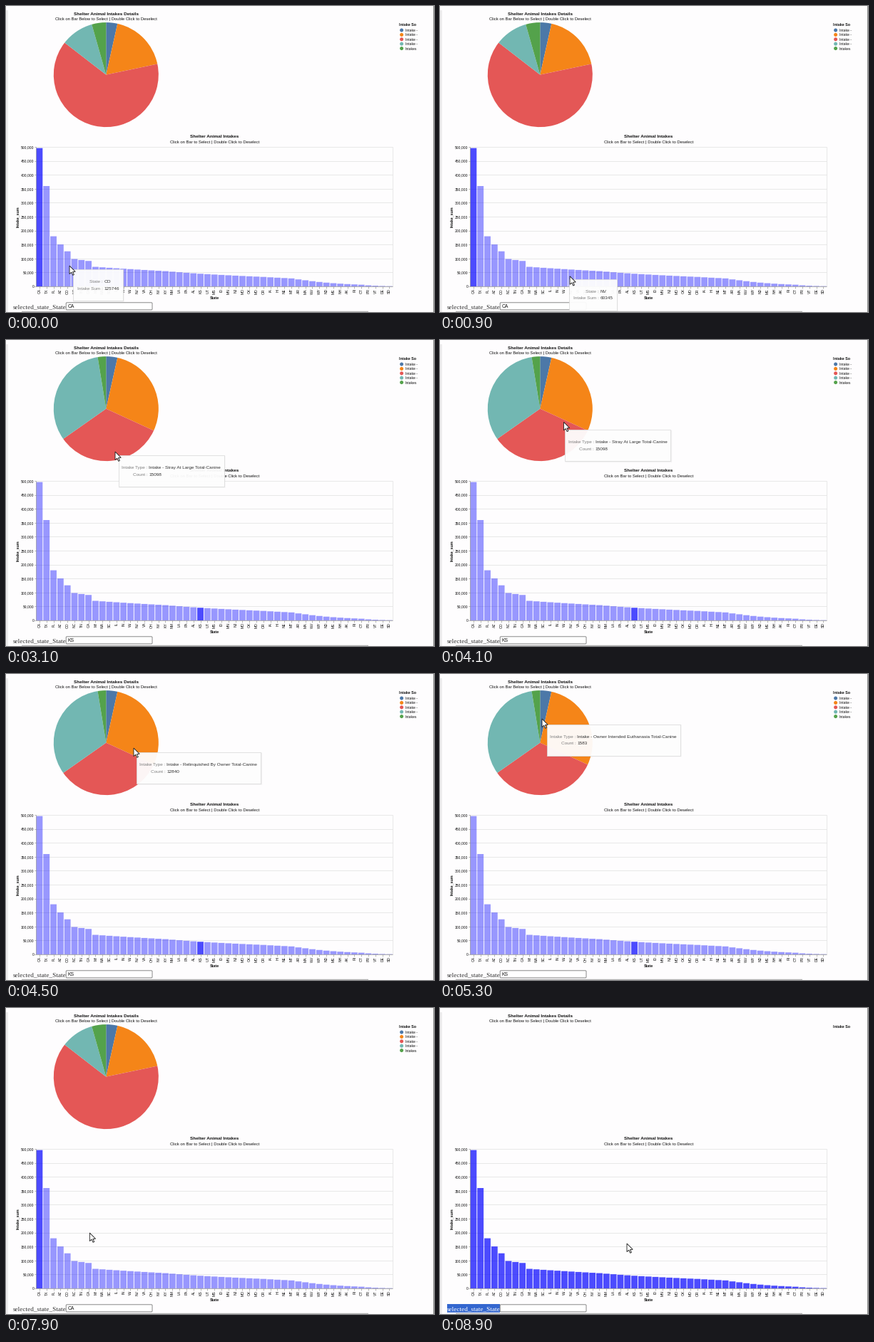
A matplotlib script that plays this animation: 600x430 px, repeating every 9 s.

```python
import math

import matplotlib.pyplot as plt
import numpy as np
from matplotlib.animation import FuncAnimation
from matplotlib.patches import Circle, FancyBboxPatch, Polygon, Rectangle, Wedge

W, H, DPI = 600, 430, 100
STEP, LOOP = 100, 9000
SANS, SERIF = "Liberation Sans", "Liberation Serif"

STATES = ("CA TX FL AZ CO NC TN GA MI WA SC IL IN WI NV VA OH NY KY NM LA PA AL KS "
          "UT MS ID MN NJ MO OK MD OR IA HI NE MT AR MA WV WY ND ME NH AK RI CT PR "
          "VT DE SD").split()
# Sums decay geometrically between a few known states
KNOWN = {"CA": 495812, "TX": 359704, "FL": 179630, "CO": 125746, "NC": 98215,
         "GA": 91146, "MI": 70032, "KY": 54644, "KS": 45261, "OR": 33940,
         "MT": 28602, "MA": 21903, "CT": 5984, "SD": 980}
SUMS = np.rint(np.exp(np.interp(range(len(STATES)),
                                [STATES.index(s) for s in KNOWN],
                                np.log(list(KNOWN.values()))))).astype(int)

TYPES = ["Intake - Owner Intended Euthanasia Total-Canine",
         "Intake - Relinquished By Owner Total-Canine",
         "Intake - Stray At Large Total-Canine",
         "Intake - Transferred In Total-Canine",
         "Intakes - Other Total-Canine"]
COLORS = ["#4c78a8", "#f58518", "#e45756", "#72b7b2", "#54a24b"]
PIES = {"CA": np.array([3.5, 18.2, 63.8, 10.1, 4.4]),
        "KY": np.array([1.0, 34.0, 46.7, 13.4, 4.9]),
        "KS": np.array([1583, 12840, 15098, 14580, 1160])}
PIES["NV"] = (PIES["CA"] + PIES["KY"]) / 2

# Time of each click and the state it selects
CLICKS = [(0, "CA"), (1000, "NV"), (1800, "KY"), (2500, "KS"), (7400, "CA"), (8700, None)]
# Cursor moves: start time, end time, destination
START = (89, 365)
MOVES = [
    (300, 1000, 184, 380), (1400, 1800, 225, 383), (1900, 2400, 272, 384),
    (2500, 3000, 153, 157), (3600, 4530, 179, 104), (4900, 5300, 143, 63),
    (5900, 6300, 107, 78), (6600, 6800, 65, 162), (6800, 7400, 48, 268),
    (7700, 8000, 126, 322), (8100, 8400, 262, 331),
]

LEFT, RIGHT, TOP, BASE = 42, 542.3, 198, 394
BAND = (RIGHT - LEFT) / len(STATES)
PIE_X, PIE_Y, PIE_R = 140.3, 96.6, 73.5
ARROW = np.array([(0, 0), (0, 11.6), (2.7, 9.2), (4.7, 13.3), (6.4, 12.5),
                  (4.5, 8.5), (8.2, 8.3)])

fig = plt.figure(figsize=(W / DPI, H / DPI), dpi=DPI, facecolor="#fefdfe")
ax = fig.add_axes([0, 0, 1, 1])
ax.set(xlim=(0, W), ylim=(H, 0))
ax.axis("off")


def pt(px):
    return px * 72 / DPI


def text(x, y, s, px, ha="left", color="#111111", z=4, **kw):
    kw.setdefault("family", SANS)
    kw.setdefault("va", "center_baseline")
    return ax.text(x, y, s, fontsize=pt(px), ha=ha, color=color, zorder=z, **kw)


def rect(x, y, w, h, color, z=1, **kw):
    return ax.add_patch(Rectangle((x, y), w, h, fc=color, lw=0, zorder=z,
                                  snap=False, **kw))


def line(x0, y0, x1, y1, color, z=1, px=0.6):
    ax.plot([x0, x1], [y0, y1], color=color, lw=pt(px), zorder=z,
            solid_capstyle="butt")


def y_of(value):
    return BASE - (BASE - TOP) * value / 500000


# Page edges
rect(0, 6, 3, H - 6, "#eeedee")
rect(599, 0, 1, H, "#8a8a8a")
rect(22, 428.8, 486, 1.2, "#b4b4b4")

# Headings
text(140.5, 10.8, "Shelter Animal Intakes Details", 6.4, "center", weight="bold")
text(140.5, 18, "Click on Bar Below to Select | Double Click to Deselect", 5.9, "center")
text(292.5, 183, "Shelter Animal Intakes", 6.4, "center", weight="bold")
text(292.5, 190.5, "Click on Bar to Select | Double Click to Deselect", 5.9, "center")

# Legend
text(551, 25.8, "Intake So", 5.4, weight="bold")
legend = []
for i, color in enumerate(COLORS):
    y = 34 + 6.4 * i
    legend.append(ax.add_patch(Circle((554.6, y), 2.5, fc=color, lw=0)))
    legend.append(text(560, y, "Intakes" if i == 4 else "Intake -", 5))

# Axes
for value in range(0, 500001, 50000):
    y = y_of(value)
    line(LEFT, y, RIGHT, y, "#e0e0e0", px=0.7)
    line(LEFT - 2.5, y, LEFT, y, "#888888")
    text(39.2, y, f"{value:,}", 5, "right")
line(RIGHT, TOP, RIGHT, BASE, "#e0e0e0", px=0.7)
line(LEFT, TOP, LEFT, BASE, "#888888", 3)
line(LEFT, BASE, RIGHT, BASE, "#888888", 3)
text(292.5, 410, "State", 5.4, "center", weight="bold")
text(16.5, 296, "Intake_sum", 5.4, "center", weight="bold", rotation=90, va="center")

# Bars
bars = []
for i, (state, total) in enumerate(zip(STATES, SUMS)):
    x = LEFT + BAND * (i + 0.5)
    y = y_of(total)
    bars.append(rect(x - BAND * 0.45, y, BAND * 0.9, BASE - y, "#0000ff", 2))
    line(x, BASE, x, BASE + 2.5, "#888888")
    text(x + 0.3, 397, state, 5.1, "center", rotation=90, va="top")

wedges = [ax.add_patch(Wedge((PIE_X, PIE_Y), PIE_R, 0, 1, fc=c, lw=0, zorder=2))
          for c in COLORS]

# Selection field
highlight = rect(10, 416, 74, 11.8, "#3467cf")
label = text(10, 421.8, "selected_state_State", 9.2, family=SERIF)
ax.add_patch(FancyBboxPatch((85.4, 418), 118.4, 7.7, boxstyle="round,pad=1.2",
                            fc="white", ec="#7c7c7c", lw=pt(0.9), zorder=3))
field = text(86.2, 421.9, "", 6.8)

# Tooltip: soft shadow, box, two rows
shadows = [rect(0, 0, 1, 44, "black", 6, alpha=0.03) for _ in range(3)]
box = ax.add_patch(Rectangle((0, 0), 1, 44, fc=(1, 1, 1, 0.95), ec="#dcdcdc",
                             lw=pt(0.8), zorder=7))
keys = [text(0, 0, "", 6.4, "right", "#808080", 8) for _ in range(2)]
vals = [text(0, 0, "", 6.4, "left", "#333333", 8) for _ in range(2)]
tooltip = [*shadows, box, *keys, *vals]

cursor = ax.add_patch(Polygon(ARROW, fc="white", ec="#222222", lw=pt(0.9), zorder=10))


def cursor_at(t):
    """Follow the moves, each one slowing down towards its end."""
    pos = np.array(START, float)
    for begin, end, x, y in MOVES:
        u = np.clip((t - begin) / (end - begin), 0, 1)
        pos += (np.array((x, y)) - pos) * (1 - (1 - u) ** 2)
    return pos


def pie_angles(state):
    edges = np.cumsum([0, *PIES[state]])
    return edges / edges[-1] * 360


def hovered(x, y, state):
    """Tooltip rows and value offset for whatever lies under the cursor."""
    i = math.floor((x - LEFT) / BAND)
    if 0 <= i < len(STATES) and y_of(SUMS[i]) <= y <= BASE:
        return [("State :", STATES[i]), ("Intake Sum :", str(SUMS[i]))], 44
    dx, dy = x - PIE_X, y - PIE_Y
    if state and math.hypot(dx, dy) <= PIE_R:
        angle = math.degrees(math.atan2(dx, -dy)) % 360
        k = min(int(np.searchsorted(pie_angles(state), angle, side="right")) - 1, 4)
        return [("Intake Type :", TYPES[k]), ("Count :", str(PIES[state][k]))], 42.5
    return None, 0


def text_width(artist):
    return artist.get_window_extent().transformed(ax.transData.inverted()).width


def place_tooltip(rows, offset, x, y):
    for artist in tooltip:
        artist.set_visible(rows is not None)
    if rows is None:
        return
    for i, (key, value) in enumerate(rows):
        row_y = y + 17 + 9.7 * i
        keys[i].set_text(key)
        keys[i].set_position((x + offset - 1.8, row_y))
        vals[i].set_text(value)
        vals[i].set_position((x + offset, row_y))
    width = offset + max(map(text_width, vals)) + 5
    box.set_xy((x, y))
    box.set_width(width)
    for i, shadow in enumerate(shadows):
        shadow.set_xy((x + 0.5, y + 0.5))
        shadow.set_width(width + 0.7 * i)
        shadow.set_height(44 + 0.7 * i)


def show_selection(state):
    for name, bar in zip(STATES, bars):
        bar.set_alpha(0.7 if state in (None, name) else 0.4)
    for artist in legend + wedges:
        artist.set_visible(state is not None)
    if state:
        angles = pie_angles(state) - 90
        for wedge, start, end in zip(wedges, angles, angles[1:]):
            wedge.set_theta1(start)
            wedge.set_theta2(end)
    field.set_text(state or "")
    highlight.set_visible(state is None)
    label.set_color("#333333" if state else "white")


def draw(frame):
    t = frame * STEP
    state = [s for start, s in CLICKS if start <= t][-1]
    show_selection(state)
    x, y = cursor_at(t)
    cursor.set_xy(ARROW + (x, y))
    rows, offset = hovered(x, y, state)
    # The tooltip trails the cursor by one step
    trail_x, trail_y = cursor_at(t - STEP)
    place_tooltip(rows, offset, trail_x + 4.5, trail_y + 5)
    return []


anim = FuncAnimation(fig, draw, frames=LOOP // STEP, interval=STEP,
                     repeat=True, repeat_delay=0, blit=False)
plt.show()
```
